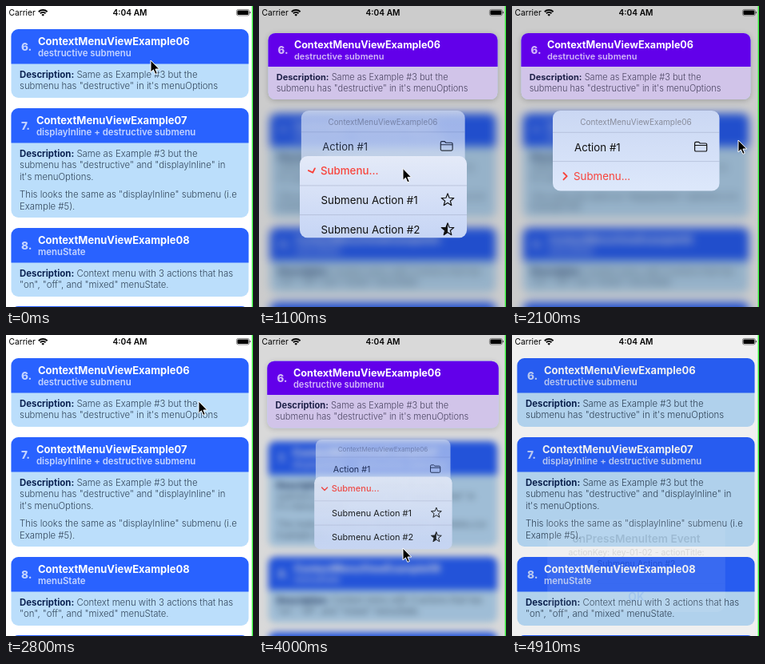
These frames come from a looping animation (309 by 377 pixels, 5030 ms). An HTML page:

```html
<!DOCTYPE html>
<html lang="en">
<head>
<meta charset="utf-8">
<title>Context menu demo</title>
<style>
  html, body { margin: 0; width: 100%; height: 100%; overflow: hidden; background: #fff; }
  svg { display: block; width: 309px; height: 377px; }
  text { font-family: Inter, "Liberation Sans", sans-serif; white-space: pre; }
  .title { font-size: 13px; font-weight: 700; fill: #fff; }
  .sub { font-size: 11.4px; font-weight: 600; fill: #fff; opacity: .72; }
  .num { font-size: 13.6px; font-weight: 800; fill: #fff; opacity: .72; }
  .desc { font-size: 11.4px; font-weight: 300; }
  .desc tspan { font-weight: 700; }
  .item { font-size: 13.3px; fill: #111; }
  .red { fill: #f8443c; }
  .mid { text-anchor: middle; }
  .icon { fill: none; stroke: #111; stroke-width: 1.2; stroke-linejoin: round; }
  .arrow { fill: none; stroke: #f8443c; stroke-width: 1.9; stroke-linecap: round; stroke-linejoin: round; }
  .line { stroke: #8790ad; stroke-opacity: .5; stroke-width: .7; }
</style>
</head>
<body>
<svg id="stage" viewBox="0 0 309 377" xmlns="http://www.w3.org/2000/svg"></svg>
<script>
const LOOP = 5030;

const text = (x, y, cls, str, extra = "") => `<text x="${x}" y="${y}" class="${cls}" ${extra}>${str}</text>`;
const rule = (y, x1, x2) => `<path class="line" d="M${x1} ${y}H${x2}"/>`;

const BLUE = { head: "#2962ff", body: "#bbdefb", bold: "#0b2251", ink: "#33475c" };
const PURPLE = { head: "#6200ea", body: "#d1c4e9", bold: "#1e2148", ink: "#4c4663" };

function card(y, h, num, tx, title, sub, lines, c) {
  const bold = `<tspan fill="${c.bold}">Description:</tspan> `;
  const body = lines.map(([dy, s], i) => text(17, y + dy, "desc", (i ? "" : bold) + s, `fill="${c.ink}"`)).join("");
  return `<rect x="6.5" y="${y}" width="297" height="${h}" rx="9" fill="${c.body}"/>
    <path d="M6.5 ${y + 43.5}v-34.5a9 9 0 0 1 9-9h279a9 9 0 0 1 9 9v34.5z" fill="${c.head}"/>
    ${text(19, y + 27, "num", num)}${text(tx, y + 20, "title", title)}${text(tx, y + 34, "sub", sub)}${body}`;
}

const firstCard = c => card(29, 86, "6.", 40, "ContextMenuViewExample06", "destructive submenu", [
  [61, "Same as Example #3 but the"],
  [75.3, 'submenu has "destructive" in it\'s menuOptions']], c);

const otherCards =
  card(128, 137, "7.", 38, "ContextMenuViewExample07", "displayInline + destructive submenu", [
    [61, "Same as Example #3 but the"],
    [75.3, 'submenu has "destructive" and "displayInline" in'],
    [89.5, "it's menuOptions."],
    [112.3, 'This looks the same as "displayInline" submenu (i.e'],
    [126.5, "Example #5)."]], BLUE) +
  card(278, 86, "8.", 40, "ContextMenuViewExample08", "menuState", [
    [61, "Context menu with 3 actions that has"],
    [75.3, '"on", "off", and "mixed" menuState.']], BLUE) +
  card(376, 86, "", 40, "", "", [], BLUE);

function star(cx, cy, half) {
  const pts = Array.from({ length: 10 }, (_, i) => {
    const r = i % 2 ? 3.5 : 8.2, a = i * Math.PI / 5;
    return [cx + r * Math.sin(a), cy - r * Math.cos(a)].map(v => v.toFixed(2)).join(" ");
  });
  const left = [pts[0], ...pts.slice(5)];
  return `<path class="icon" d="M${pts.join("L")}Z"/>` + (half ? `<path fill="#111" d="M${left.join("L")}Z"/>` : "");
}

const statusBar = `
  ${text(3.5, 12, "", "Carrier", 'font-size="10.2"')}
  ${text(155, 12, "mid", "4:04 AM", 'font-size="10.2" font-weight="600"')}
  <g fill="none" stroke="#000" stroke-width="1.9">
    <path d="M40.8 7.2a7.7 7.7 0 0 1 10.8 0M42.9 9.3a4.7 4.7 0 0 1 6.6 0"/>
  </g>
  <path d="M46.2 12.8l-1.8-1.9a2.6 2.6 0 0 1 3.6 0z"/>
  <rect x="288.4" y="4.4" width="16" height="7.6" rx="2.2" fill="none" stroke="#555" stroke-width=".7"/>
  <rect x="289.4" y="5.4" width="14" height="5.6" rx="1.3"/>
  <path d="M305.3 6.8a1.6 1.6 0 0 1 0 2.8z"/>`;

const mainMenu = `
  <rect x="51" y="131" width="208.5" height="100.5" rx="9.5" fill="url(#glass)"/>
  ${text(155, 149, "mid", "ContextMenuViewExample06", 'font-size="10" fill="#888c9b"')}
  ${rule(158.3, 51, 259.5)}
  ${text(78, 181.5, "item", "Action #1")}
  <path class="icon" d="M228.6 180.4v-8.4a1.6 1.6 0 0 1 1.6-1.6h3.4l1.7 1.6h6.8a1.6 1.6 0 0 1 1.6 1.6v6.8a1.6 1.6 0 0 1-1.6 1.6h-11.9a1.6 1.6 0 0 1-1.6-1.6zM228.6 174.5h15"/>
  ${rule(194.6, 51, 259.5)}
  <g id="closedRow">
    <path class="arrow" d="M64.5 209l4.2 4.2-4.2 4.2"/>
    ${text(77, 218, "item red", "Submenu...")}
  </g>`;

const subMenu = `
  <rect id="subPanel" x="51" width="209" rx="9.5" fill="url(#glass2)"/>
  <g clip-path="url(#subClip)">
    <path id="subArrow" class="arrow" d="M-2.1 -4.2l4.2 4.2-4.2 4.2"/>
    ${text(77, 23, "item red", "Submenu...", 'font-weight="500"')}
    ${rule(36.8, 51, 260)}
    ${text(77.5, 59.8, "item", "Submenu Action #1")}${star(236, 55, false)}
    ${rule(73.5, 51, 260)}
    ${text(77.5, 96.5, "item", "Submenu Action #2")}${star(236, 92, true)}
  </g>`;

const alertBox = `
  <rect x="-111.3" y="-58" width="222.6" height="116" rx="11.5" fill="#eef3fb" fill-opacity=".9"/>
  <g class="mid">
    ${text(0, -29.5, "", "onPressMenuItem Event", 'font-size="13.6" font-weight="600"')}
    ${text(0, -12.7, "", "actionKey: key-01-02 - actionTitle:", 'font-size="10.5"')}
    ${text(0, .8, "", "Submenu Action #2", 'font-size="10.5"')}
    ${text(0, 44, "", "OK", 'font-size="13.8" font-weight="600" fill="#2f6bf2"')}
  </g>
  ${rule(22, -111.3, 111.3)}`;

const gradient = (id, a, b) => `<linearGradient id="${id}" x2="0" y2="1">
  <stop stop-color="${a}"/><stop offset="1" stop-color="${b}"/></linearGradient>`;

document.getElementById("stage").innerHTML = `
  <defs>
    ${gradient("glass", "#cad7f3", "#dde8fb")}${gradient("glass2", "#e4eaf8", "#c6d5f5")}
    <clipPath id="subClip"><rect id="subCut" x="51" width="209" rx="9.5"/></clipPath>
  </defs>
  <rect width="309" height="377" fill="#fff"/>
  <g id="list"><g id="first">${firstCard(BLUE)}</g>${otherCards}</g>
  <rect id="dim" width="309" height="377"/>
  ${statusBar}
  <g id="preview">
    <rect id="shadow" x="6.5" y="30" width="297" height="87" rx="9" style="filter:blur(4px)"/>
    ${firstCard(BLUE)}<g id="tint">${firstCard(PURPLE)}</g>
  </g>
  <g id="menu"><g id="main">${mainMenu}</g><g id="sub">${subMenu}</g></g>
  <g id="alert">${alertBox}</g>
  <path id="cursor" d="M0 0v15l3.4-3.2 2.4 5.6 2.5-1-2.4-5.4h4.8z" stroke="#fff" stroke-width="1"/>
  <rect x="307.6" width="1.4" height="377" fill="#35f23a"/>`;

const el = {};
document.querySelectorAll("svg [id]").forEach(n => el[n.id] = n);
const set = (n, attrs) => { for (const k in attrs) n.setAttribute(k, attrs[k]); };

// Rows of [time, value, ...]; values run straight between rows.
const tracks = {
  menu: [[100, 0], [200, .1], [300, .45], [400, .8], [500, .95], [600, 1], [2100, 1], [2200, .7], [2300, .3], [2400, .07], [2500, 0],
    [2800, 0], [2900, .2], [3000, .6], [3100, .88], [3200, .97], [3300, 1], [3900, 1], [4000, .75], [4100, .3], [4200, 0]],
  sub: [[900, 0], [1000, .45], [1100, .89], [1200, 1], [1800, 1], [1900, .5], [2000, .12], [2100, 0],
    [3500, 0], [3600, .5], [3700, .9], [3800, 1], [4200, 1], [4300, 0]],
  alert: [[4100, 0], [4200, .3], [4300, .63], [4400, .9], [4500, 1], [4600, 1], [4700, .75], [4800, .4], [4910, .1]],
  dim: [[4100, 0], [4200, .35], [4300, .7], [4400, .92], [4500, 1], [4600, 1], [4700, .8], [4800, .55], [4910, .3]],
  cursor: [[0, 181, 68], [600, 181, 70], [900, 180, 203], [1400, 180, 204], [1800, 283, 168], [2200, 283, 168], [2500, 241, 84],
    [2800, 241, 83], [3100, 239, 86], [3500, 195, 202], [3700, 190, 210], [3900, 180, 267], [4300, 180, 267], [4600, 157, 322], [4910, 157, 322]]
};

function at(name, t) {
  const rows = tracks[name];
  let i = rows.findIndex(r => r[0] > t);
  if (i < 0) i = rows.length;
  if (i === 0) return rows[0].slice(1);
  if (i === rows.length) return rows[i - 1].slice(1);
  const a = rows[i - 1], b = rows[i], k = (t - a[0]) / (b[0] - a[0]);
  return a.slice(1).map((v, j) => v + (b[j + 1] - v) * k);
}

const zoom = (x, y, s, dy = 0) => `translate(${x} ${y + dy}) scale(${s}) translate(${-x} ${-y})`;

function render(t) {
  const [m] = at("menu", t), [s] = at("sub", t), [a] = at("alert", t), [d] = at("dim", t);
  const [cx, cy] = at("cursor", t);

  set(el.list, { transform: zoom(155, 268, 1 - .047 * m) });
  el.list.style.filter = m ? `blur(${6 * m}px)` : "none";
  set(el.first, { opacity: m ? 0 : 1 });
  set(el.dim, { opacity: .2 * Math.max(m, d) });

  set(el.preview, { transform: zoom(155, 72, 1 - .034 * m, 3.5 * m), visibility: m ? "visible" : "hidden" });
  set(el.tint, { opacity: Math.min(1, m * 1.6) });
  set(el.shadow, { opacity: .2 * m });

  set(el.menu, { transform: zoom(155, 131, .3 + .7 * m), opacity: Math.min(1, m * 1.2) });
  set(el.main, { transform: zoom(155, 131, 1 - .02 * s), opacity: 1 - .3 * s });
  set(el.closedRow, { opacity: s ? 0 : 1 });
  const h = 36.8 + 73.4 * s;
  set(el.sub, { transform: `translate(0 ${194.6 - 7.3 * s})`, visibility: s ? "visible" : "hidden" });
  set(el.subPanel, { height: h });
  set(el.subCut, { height: h });
  set(el.subArrow, { transform: `translate(66.6 18.6) rotate(${90 * s * s})` });

  const grow = t < 4600 ? 1 + .15 * (1 - a) : 1;
  set(el.alert, { transform: `translate(155.5 289) scale(${grow})`, opacity: a });
  set(el.cursor, { transform: `translate(${cx} ${cy})`, visibility: t < 4900 ? "visible" : "hidden" });
}

// The picture moves ten times a second; the last step comes slightly late.
function tick() {
  const t = performance.now() % LOOP;
  render(t >= 4910 ? 4910 : Math.min(4800, Math.floor(t / 100) * 100));
  requestAnimationFrame(tick);
}
tick();
</script>
</body>
</html>
```
